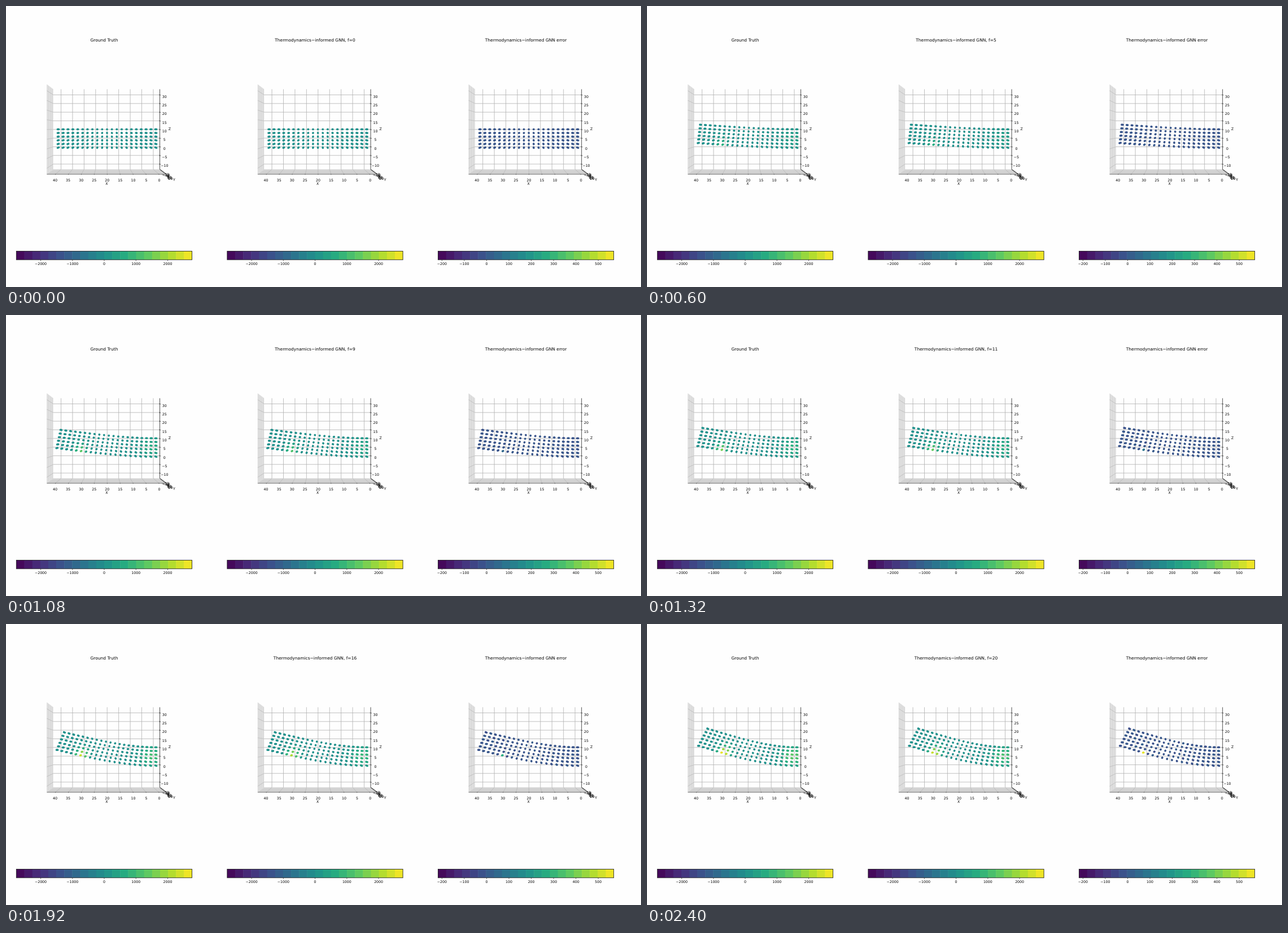
Write an HTML page with a canvas that moves like this. It is 1125x498 px and loops after 2.52 s.

```html
<!DOCTYPE html>
<html>
<head>
<meta charset="utf-8">
<style>
html, body { margin: 0; width: 100%; height: 100%; overflow: hidden; background: #fefefe; }
canvas { display: block; }
</style>
</head>
<body>
<canvas id="stage" width="1125" height="498"></canvas>
<script>
const ctx = document.getElementById('stage').getContext('2d');
const STEP = 120, LAST = 20, PANEL = 373.6;
const CX = 178.3, CY = 218.5, FRONT = 1.122;   // centre of perspective, scale of the front plane
const VIRIDIS = ['440154', '472d7b', '3b528b', '2c728e', '21918c', '28ae80', '5ec962', 'addc30', 'fde725']
  .map(h => [0, 2, 4].map(k => parseInt(h.slice(k, k + 2), 16)));

function viridis(v) {
  const p = Math.min(1, Math.max(0, v)) * 8, k = Math.min(7, Math.floor(p));
  return `rgb(${VIRIDIS[k].map((c, n) => Math.round(c + (VIRIDIS[k + 1][n] - c) * (p - k)))})`;
}

function line(x1, y1, x2, y2, color, width) {
  ctx.strokeStyle = color;
  ctx.lineWidth = width;
  ctx.beginPath();
  ctx.moveTo(x1, y1);
  ctx.lineTo(x2, y2);
  ctx.stroke();
}

function poly(color, ...pts) {
  ctx.fillStyle = color;
  ctx.beginPath();
  pts.forEach(([x, y]) => ctx.lineTo(x, y));
  ctx.fill();
}

function text(value, x, y, size = 6.25) {
  ctx.font = `${size}px "DejaVu Sans", sans-serif`;
  ctx.fillStyle = '#000';
  ctx.fillText(String(value).replace('-', '\u2212'), x, y);
}

const near = (x, y, s = FRONT) => [CX + (x - CX) * s, CY + (y - CY) * s];
const bump = (x, y) => Math.exp(-x * x - y * y);

function drawAxes() {
  const L = 83.8, R = 272.5, T = 147.5, B = 289.5, grid = '#b0b0b0', ink = '#222';
  const [fl, ft] = near(L, T), [fr, fb] = near(R, B);
  poly('#f4f4f4', [fl, ft], [L, T], [L, B], [fl, fb]);
  poly('#ececec', [fl, fb], [L, B], [R, B], [fr, fb]);

  for (let k = 0; k < 9; k++) {
    const x = 97.5 + 20.43 * k, y = 157.5 + 15.33 * k;
    const [nx] = near(x, B), [, ny] = near(L, y);
    line(x, T, x, B, grid, 0.8);
    line(x, B, nx, fb, grid, 0.6);
    line(L, y, R, y, grid, 0.8);
    line(fl, ny, L, y, grid, 0.6);
    line(nx, fb - 0.8, nx, fb + 1, ink, 0.5);
    line(R - 1.5, y, R + 2, y + 0.4, ink, 0.6);
    text(40 - 5 * k, 87 + 23.07 * k, 310.7);
    text(30 - 5 * k, 280.8, 162.6 + 15.33 * k);
  }
  for (let k = 0; k < 8; k++) {
    const s = 1 + (FRONT - 1) * (k + 0.6) / 8;
    const [x1, y1] = near(L, T, s), [x2, y2] = near(R, B, s);
    line(x1, y1, x1, y2, grid, 0.5);
    line(x1, y2, x2, y2, grid, 0.5);
    line(x2 - 1, y2, x2 + 2, y2 + 0.8, ink, 0.5);
    text(5 * k - 15, 282.5 + 1.3 * k, 300.5 + 1.05 * k);
  }
  line(R, T, R, B, ink, 0.8);
  line(fl, fb, fr, fb, ink, 0.6);
  line(R, B, fr, fb, ink, 0.8);
  text('X', 178.5, 317);
  text('Y', 298, 310);
  text('Z', 290, 220.3);
}

function drawBar(zero, unit, labels) {
  const x = 18.3, y = 434.5, w = 311.2, h = 15.3, n = 22;
  for (let k = 0; k < n; k++) {
    ctx.fillStyle = viridis((k + 0.5) / n);
    ctx.fillRect(x + w * k / n, y, w / n + (k < n - 1 ? 0.5 : 0), h);
  }
  ctx.strokeStyle = '#111';
  ctx.lineWidth = 0.8;
  ctx.strokeRect(x, y, w, h);
  for (const v of labels) {
    const lx = zero + v * unit;
    line(lx, y + h, lx, y + h + 2.2, '#222', 0.6);
    text(v, lx, 459.4);
  }
}

// Stress: a hot spot under the beam and one at the clamped end
const stress = (i, j, t, spot, clamp) => 0.5
  + spot * t * bump((i - 15.2 + 0.6 * t ** 3) / 1.13, j / 1.8)
  + clamp * t * bump((i - 0.8) / 2.2, (j - 2.6) / 2.4);

function error(i, j, t) {
  const ripple = Math.sin(i * 12.9 + j * 78.2) * Math.sin(i * 3.7 - j * 5.1);
  return i === 15 && j === 0 ? 0.272 + 0.69 * t ** 3 : 0.265 + 0.035 * t * ripple;
}

// Cantilever bending upwards: integrate the slope along 21 columns of 6 nodes
function drawBeam(t, value) {
  const tip = 0.382 * t ** 1.04, sub = 8;
  const slope = s => tip * (1 - (1 - s) ** 2.3);
  let x = 0, z = 5;
  ctx.lineCap = 'round';
  for (let i = 0; i <= 20; i++) {
    const a = slope(i / 20);
    for (let j = 0; j < 6; j++) {
      const h = 2 * j - 5;
      const px = 265.5 - 4.325 * (x - h * Math.sin(a));
      const py = 251 - 3.25 * (z + h * Math.cos(a));
      line(...near(px, py, 0.988), ...near(px, py, 1.012), viridis(value(i, j, t)), 3.7);
    }
    for (let k = 0; k < sub; k++) {
      const b = slope(Math.min(1, (i + (k + 0.5) / sub) / 20));
      x += 2 / sub * Math.cos(b);
      z += 2 / sub * Math.sin(b);
    }
  }
  ctx.lineCap = 'butt';
}

const wide = [174, 0.05625, [-2000, -1000, 0, 1000, 2000]];
const panels = [
  { title: () => 'Ground Truth', bar: wide, value: (i, j, t) => stress(i, j, t, 0.53, 0.25) },
  { title: f => `Thermodynamics-informed GNN, f=${f}`, bar: wide, value: (i, j, t) => stress(i, j, t, 0.47, 0.21) },
  { title: () => 'Thermodynamics-informed GNN error', bar: [104.3, 0.3955, [-200, -100, 0, 100, 200, 300, 400, 500]], value: error },
];

const start = performance.now();
function draw() {
  const f = Math.floor((performance.now() - start) / STEP) % (LAST + 1);
  ctx.setTransform(1, 0, 0, 1, 0, 0);
  ctx.fillStyle = '#fefefe';
  ctx.fillRect(0, 0, 1125, 498);
  ctx.textAlign = 'center';
  panels.forEach((p, n) => {
    ctx.setTransform(1, 0, 0, 1, PANEL * n, 0);
    drawAxes();
    drawBeam(f / LAST, p.value);
    drawBar(...p.bar);
    text(p.title(f), 173.9, 63, 7.5);
  });
  requestAnimationFrame(draw);
}
draw();
</script>
</body>
</html>
```
